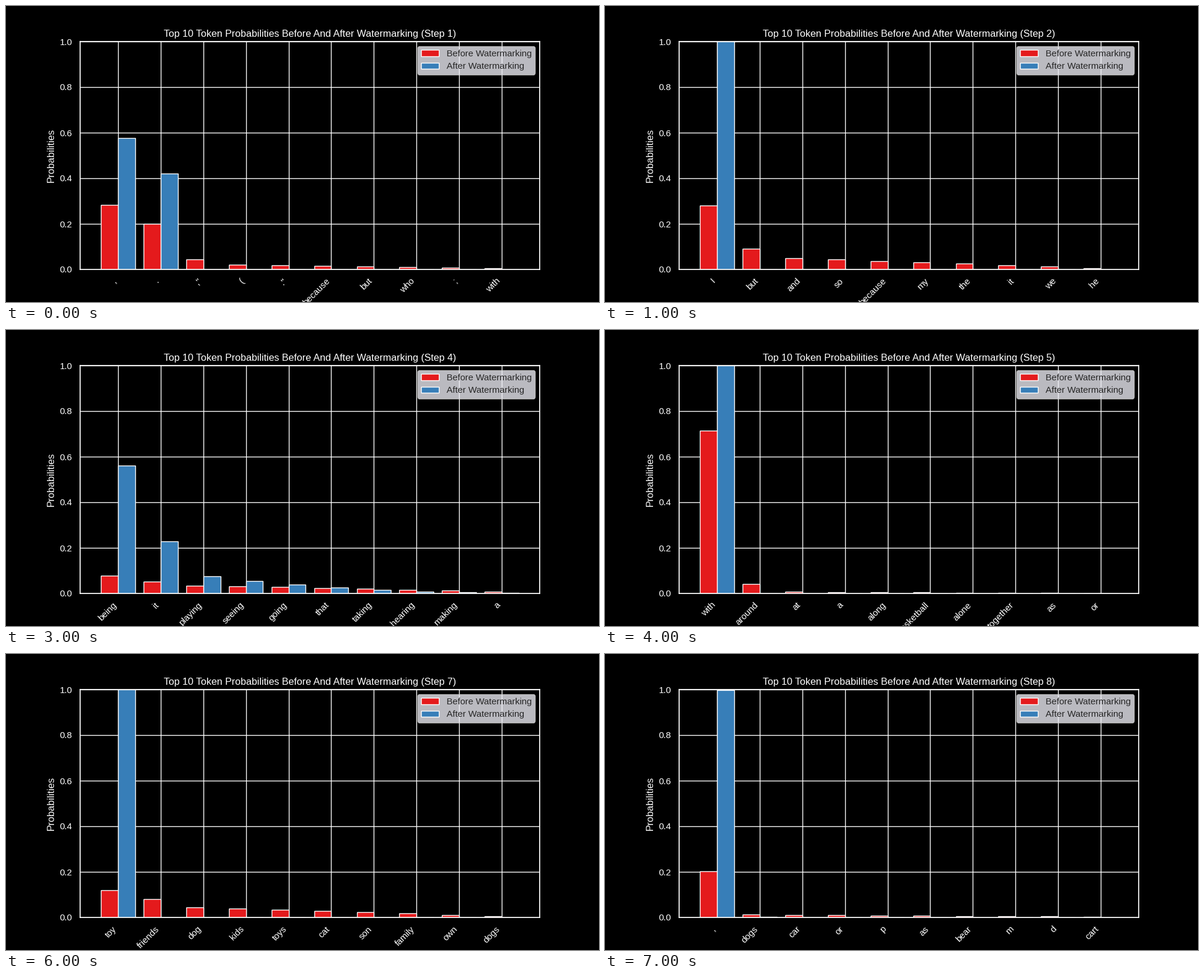
Recreate the animation shown at these times as a matplotlib script. Size 1000 by 500 pixels, loop 8000 ms.

```python
import matplotlib.pyplot as plt
import numpy as np
from matplotlib.animation import FuncAnimation

plt.rcParams.update({
    "font.family": "Liberation Sans",
    "font.size": 12,
    "axes.titlesize": 12,
    "axes.labelsize": 12,
    "xtick.labelsize": 11,
    "ytick.labelsize": 11,
    "legend.fontsize": 11,
    "figure.facecolor": "black",
    "axes.facecolor": "black",
    "axes.edgecolor": "white",
    "axes.labelcolor": "white",
    "text.color": "white",
    "xtick.color": "white",
    "ytick.color": "white",
    "axes.linewidth": 1.25,
    "axes.grid": True,
    "axes.axisbelow": True,
    "axes.labelpad": 4.8,
    "grid.color": "white",
    "grid.linewidth": 1,
    "grid.linestyle": "-",
    "patch.linewidth": 1,
    "xtick.bottom": False,
    "ytick.left": False,
    "xtick.major.size": 6,
    "ytick.major.size": 6,
    "xtick.major.pad": 3,
})

RED, BLUE = "#e41a1c", "#377eb8"
BAR_WIDTH = 0.4
TOKEN_COUNT = 10


def ranked(*head, tail=(0, 0), power=1):
    """Leading probabilities followed by a smooth fall between two values."""
    start, end = tail
    t = np.linspace(0, 1, TOKEN_COUNT - len(head))
    return np.append(head, end + (start - end) * (1 - t) ** power)


CERTAIN = ranked(1)

# Each step: tokens, probabilities before, probabilities after.
STEPS = [
    (", . ,\" ( .\" because but who ; with",
     ranked(.283, .2, .044, tail=(.02, .005)), ranked(.577, .421)),
    ("I but and so because my the it we he",
     ranked(.28, .09, tail=(.05, .006)), CERTAIN),
    ("love 've know really just want 'll 'd try wish",
     ranked(.179, .046, tail=(.021, .005)), CERTAIN),
    ("being it playing seeing going that taking hearing making a",
     ranked(.078, .052, tail=(.035, .008)),
     ranked(.561, .2285, tail=(.075, .0026), power=2)),
    ("with around at a along basketball alone together as or",
     ranked(.714, .0415, tail=(.007, .001)), CERTAIN),
    ("my them his myself dogs and all each mine others",
     ranked(.392, .049, .031, tail=(.006, .001)), CERTAIN),
    ("toy friends dog kids toys cat son family own dogs",
     ranked(.12, .08, tail=(.045, .006)), CERTAIN),
    (", dogs car or p as bear m d cart",
     ranked(.203, tail=(.012, .003)), ranked(.997, .003)),
]

fig, ax = plt.subplots(figsize=(10, 5), dpi=100)


def draw_step(index):
    tokens, before, after = STEPS[index]
    x = np.arange(TOKEN_COUNT)

    ax.clear()
    for side, heights, color, name in ((-0.5, before, RED, "Before"),
                                       (0.5, after, BLUE, "After")):
        ax.bar(x + side * BAR_WIDTH, heights, BAR_WIDTH, color=color,
               edgecolor="white", label=f"{name} Watermarking")
    ax.set_ylim(0, 1)
    ax.set_ylabel("Probabilities")
    ax.set_title("Top 10 Token Probabilities Before And After "
                 f"Watermarking (Step {index + 1})")
    ax.set_xticks(x, tokens.split(), rotation=45, ha="right")
    ax.legend(loc="upper right", facecolor="#eaeaf2", edgecolor="0.8",
              framealpha=0.8, labelcolor="0.15")


anim = FuncAnimation(fig, draw_step, frames=len(STEPS), interval=1000,
                     init_func=lambda: draw_step(0), repeat=True)
plt.show()
```
